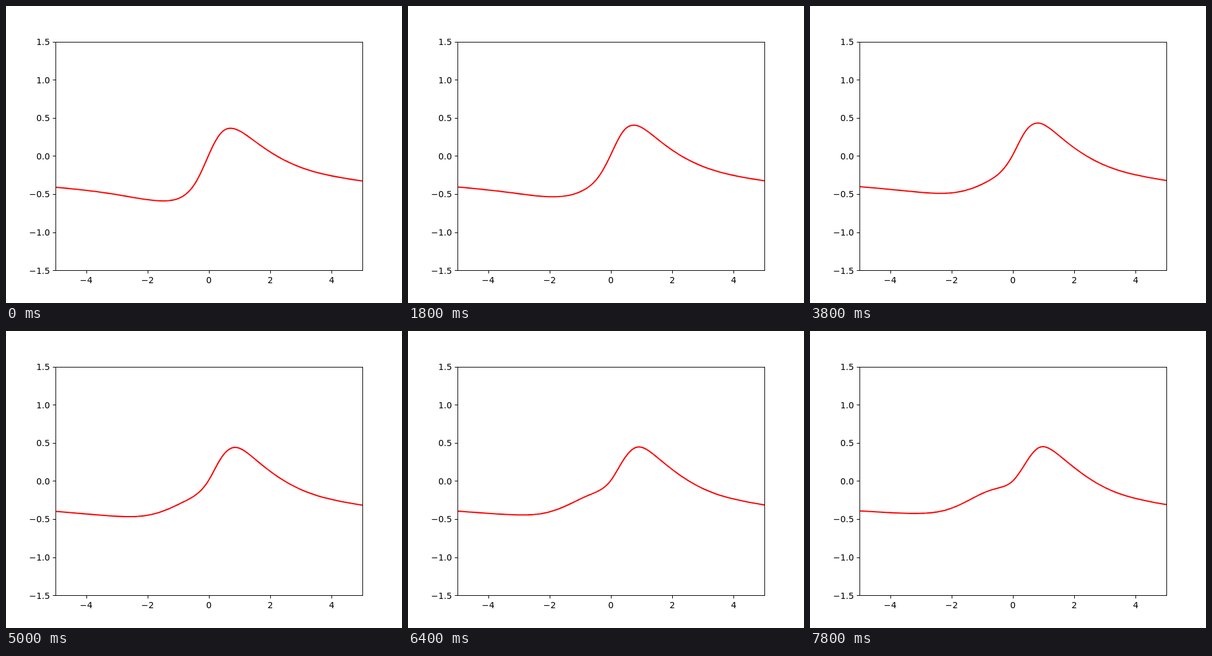
An HTML page for the animation above (8000 ms loop, 640 px wide and 480 px high).

```html
<!DOCTYPE html>
<html lang="en">
<head>
<meta charset="utf-8">
<title>Evolving curve</title>
<style>
  html, body { margin: 0; width: 100%; height: 100%; overflow: hidden; background: #fff; }
  svg { display: block; }
  text { font: 13.89px "DejaVu Sans", sans-serif; }
  .axis { fill: none; stroke: #000; }
  #curve { fill: none; stroke: #f00; stroke-width: 2.08; stroke-linejoin: round; }
</style>
</head>
<body>
<svg width="640" height="480" viewBox="0 0 640 480">
  <clipPath id="plot"><rect x="80" y="58" width="496" height="369"/></clipPath>
  <path id="curve" clip-path="url(#plot)"/>
  <g id="axes"><rect class="axis" x="80.5" y="58.5" width="496" height="369"/></g>
</svg>
<script>
const LOOP = 8000, STEP = 200;

// Curve heights at 13 knots, for three moments of the evolution.
const POSES = [
  { time: 0, heights: [-.41, -.481, -.555, -.589, -.539, -.339, .02, .313, .347, .192, -.021, -.205, -.328] },
  { time: 3800, heights: [-.402, -.461, -.49, -.446, -.348, -.218, .018, .331, .427, .265, .024, -.185, -.321] },
  { time: 7800, heights: [-.392, -.425, -.393, -.265, -.146, -.086, .003, .239, .446, .338, .084, -.159, -.31] }
];
const LAST = 12, DETAIL = 10, WARP = 2.2;

const axes = document.getElementById("axes");
const curve = document.getElementById("curve");

const toX = v => 328 + v * 49.6;
const toY = v => 242.4 - v * 123.2;
const snap = v => Math.floor(v + 0.5) + 0.5;
const label = (v, digits) => v.toFixed(digits).replace("-", "\u2212");

// Knots lie closer together near zero, where the curve bends most.
const knotX = u => 5 * Math.sinh(WARP * (2 * u / LAST - 1)) / Math.sinh(WARP);

function add(tag, attributes, content = "") {
  const node = document.createElementNS(axes.namespaceURI, tag);
  for (const name in attributes) node.setAttribute(name, attributes[name]);
  node.textContent = content;
  axes.append(node);
}

function drawTicks() {
  for (let v = -4; v <= 4; v += 2) {
    add("path", { class: "axis", d: `M${snap(toX(v))} 427.5v4.86` });
    add("text", { x: toX(v), y: 448, "text-anchor": "middle" }, label(v, 0));
  }
  for (let v = -1.5; v <= 1.5; v += 0.5) {
    add("path", { class: "axis", d: `M80.5 ${snap(toY(v))}h-4.86` });
    add("text", { x: 71, y: Math.round(toY(v) + 5.3), "text-anchor": "end" }, label(v, 1));
  }
}

// Blend the poses along a parabola in time.
function heightsAt(t) {
  const weights = POSES.map(a => POSES.reduce(
    (w, b) => a === b ? w : w * (t - b.time) / (a.time - b.time), 1));
  return POSES[0].heights.map((_, i) =>
    POSES.reduce((sum, pose, k) => sum + weights[k] * pose.heights[i], 0));
}

// Slopes of the natural cubic spline, found by relaxation.
function splineSlopes(y) {
  const m = y.map(() => 0);
  for (let pass = 0; pass < 20; pass++) {
    m[0] = (3 * (y[1] - y[0]) - m[1]) / 2;
    for (let i = 1; i < LAST; i++) m[i] = (3 * (y[i + 1] - y[i - 1]) - m[i - 1] - m[i + 1]) / 4;
    m[LAST] = (3 * (y[LAST] - y[LAST - 1]) - m[LAST - 1]) / 2;
  }
  return m;
}

function curvePath(y) {
  const m = splineSlopes(y), points = [];
  for (let n = 0; n <= LAST * DETAIL; n++) {
    const u = n / DETAIL, i = Math.min(Math.floor(u), LAST - 1), s = u - i, r = 1 - s;
    const v = r * r * ((1 + 2 * s) * y[i] + s * m[i])
            + s * s * ((1 + 2 * r) * y[i + 1] - r * m[i + 1]);
    points.push([toX(knotX(u)), toY(v)]);
  }
  return "M" + points.join("L");
}

function draw() {
  const t = Math.floor(performance.now() % LOOP / STEP) * STEP;
  curve.setAttribute("d", curvePath(heightsAt(t)));
  requestAnimationFrame(draw);
}

drawTicks();
draw();
</script>
</body>
</html>
```
